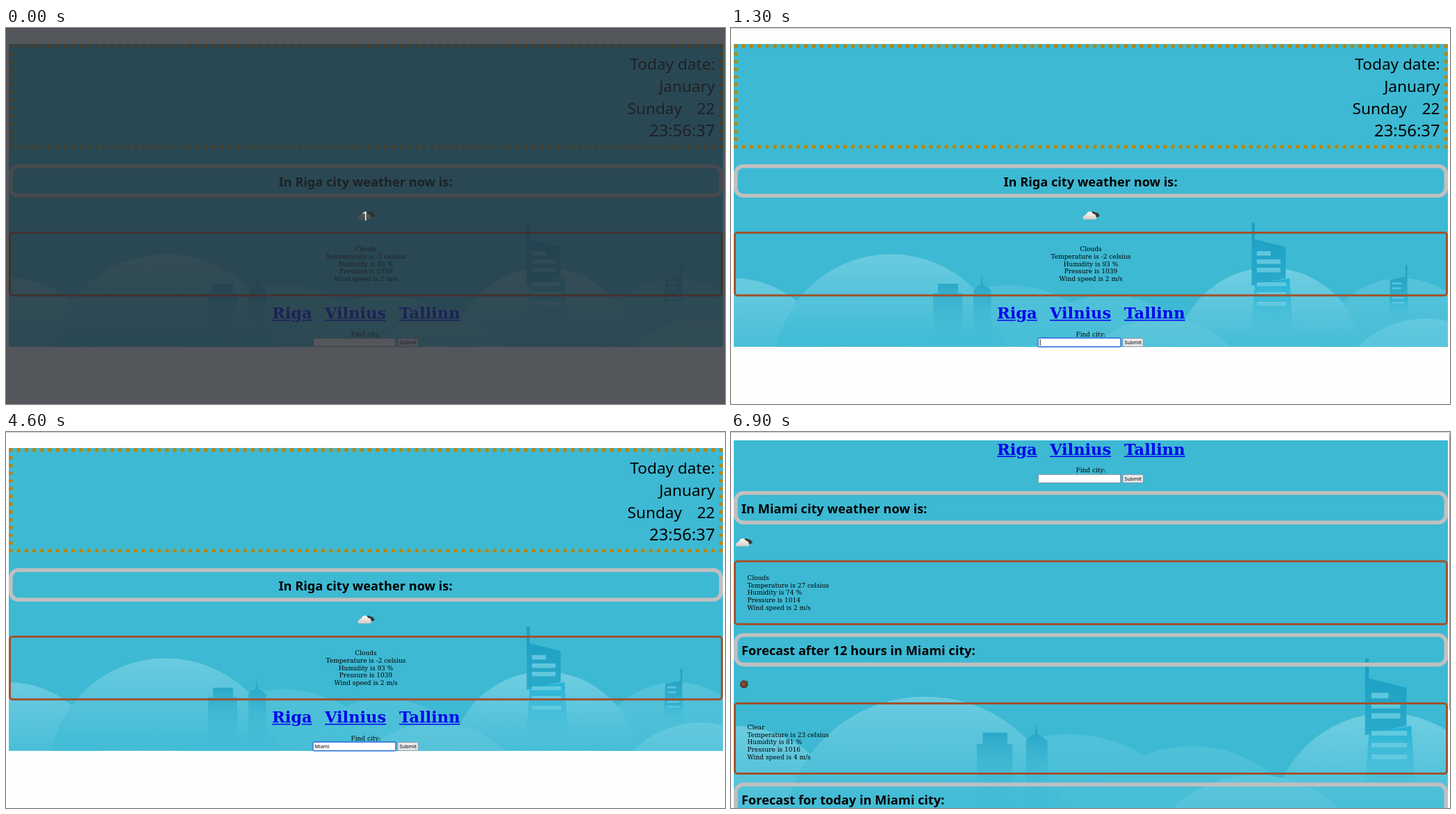
An HTML page with a canvas that plays this animation: 1035 by 541 pixels, repeating every 8 s.

```html
<!DOCTYPE html>
<html lang="en">
<head>
<meta charset="utf-8">
<title>City weather</title>
<style>
html, body { margin: 0; width: 100%; height: 100%; overflow: hidden; background: #fefefd; }
canvas { display: block; width: 1035px; height: 541px; }
</style>
</head>
<body>
<canvas id="stage" width="1035" height="541"></canvas>
<script>
const ctx = document.getElementById('stage').getContext('2d');
const LOOP = 8000, W = 1035, H = 541, LEFT = 4, RIGHT = 1032;
const TEAL = '#3db9d3';
const SERIF = '"DejaVu Serif", serif';
const SANS = '"Noto Sans", "Open Sans", sans-serif';
const COMIC = '"Comic Sans MS", "Comic Neue", "Noto Sans", sans-serif';
const CITIES = ['Mexico', 'Miami', 'Monaco', 'Magadan', 'Moscow'];

function rect(x, y, w, h, color) {
  ctx.fillStyle = color;
  ctx.fillRect(x, y, w, h);
}

function poly(color, ...pts) {
  ctx.fillStyle = color;
  ctx.beginPath();
  for (let i = 0; i < pts.length; i += 2) ctx.lineTo(pts[i], pts[i + 1]);
  ctx.fill();
}

function dot(x, y, r, color) {
  ctx.fillStyle = color;
  ctx.beginPath();
  ctx.arc(x, y, r, 0, 7);
  ctx.fill();
}

function panel(x, y, w, h, r, fill, line, width = 1) {
  ctx.beginPath();
  ctx.roundRect(x, y, w, h, r);
  if (fill) { ctx.fillStyle = fill; ctx.fill(); }
  if (line) { ctx.strokeStyle = line; ctx.lineWidth = width; ctx.stroke(); }
}

function text(str, x, y, font, align = 'left', color = '#000') {
  ctx.font = font;
  ctx.textAlign = align;
  ctx.fillStyle = color;
  ctx.fillText(str, x, y);
}

function fade(y0, y1, from, to) {
  const g = ctx.createLinearGradient(0, y0, 0, y1);
  g.addColorStop(0, from);
  g.addColorStop(1, to);
  return g;
}

const dome = (x, y, r, from = '#6acbdf') =>
  dot(x, y, r, fade(y - r, y - r + 120, from, '#43bcd6'));

function windows(x, w, ys, h, color) {
  for (const y of ys) rect(x, y, w, h, color);
}

// Skyline image, anchored to the top left corner of the page body
function skyline(top, bottom, scale) {
  ctx.save();
  ctx.beginPath();
  ctx.rect(LEFT, top, RIGHT - LEFT, bottom - top);
  ctx.clip();
  rect(0, top, W, H, TEAL);
  ctx.translate(LEFT, top);
  ctx.scale(scale, scale);
  ctx.translate(-4, -23);

  dome(965, 480, 120, '#55c3da');
  dome(400, 540, 170, '#50c1d9');
  dome(545, 534, 150, '#4fc1d9');
  dome(4, 500, 140);
  dome(230, 494, 168.6);
  dome(775, 481, 136, '#70cee1');

  const block = fade(368, 455, '#2aa8c9', 'rgba(67,188,214,0)');
  rect(298, 368, 29, 14, block);
  rect(291, 381.5, 42, 78, block);
  poly(block, 361, 355, 363, 370, 368, 372, 374.5, 378, 374.5, 458, 349, 458, 349, 378, 354, 372, 359.5, 370);

  const steel = fade(280, 375, '#1b9ec2', '#2aabcc');
  poly(steel, 749.5, 280, 754, 281, 754, 304, 798.5, 315, 798.5, 360, 749.5, 371);
  poly(fade(360, 434, '#22b2d6', 'rgba(60,186,214,.15)'), 754, 369, 804, 360, 809, 434, 749, 434);
  windows(757, 20, [321], 6.5, '#5ec7dd');
  windows(757, 34, [333, 345], 6.5, '#5ec7dd');
  windows(757, 42, [366, 380, 394], 5.5, '#63cae0');

  poly(fade(341, 400, '#219fc0', '#38b2d0'), 971, 341, 973.5, 341, 973.5, 394, 948, 394, 949, 362, 971, 358);
  poly(fade(380, 422, '#2bb2d3', 'rgba(67,188,214,0)'), 948, 384, 974, 380, 975, 422, 947, 422);
  windows(952, 13, [366, 373], 3, '#55c2da');
  windows(952, 17, [387, 394], 2.5, '#5ec7dd');

  dome(620, 560, 142, '#5cc6db');
  dome(1000, 556, 138, '#63c9de');
  ctx.restore();
}

function dottedFrame(top, bottom) {
  const gold = '#b8860b', x0 = 6.9, x1 = 1029.2, nx = 91, ny = 13;
  for (let i = 0; i <= nx; i++) {
    const x = x0 + (x1 - x0) * i / nx;
    dot(x, top, 2.8, gold);
    dot(x, bottom, 2.8, gold);
  }
  for (let i = 1; i < ny; i++) {
    const y = top + (bottom - top) * i / ny;
    dot(x0, y, 2.8, gold);
    dot(x1, y, 2.8, gold);
  }
}

function heading(str, top, centered) {
  panel(LEFT + 2.8, top + 2.8, 1022.4, 42.4, 11, null, '#c0c0c0', 5.6);
  text(str, centered ? 517.5 : 15, top + 31.7, 'bold 18.2px ' + COMIC, centered ? 'center' : 'left');
}

function report(lines, top, height, first, centered) {
  panel(LEFT + 1.5, top + 1.5, 1025, height - 3, 4, null, '#a0522d', 3);
  lines.forEach((s, i) =>
    text(s, centered ? 518 : 23.5, first + i * 10.69, '9px ' + SERIF, centered ? 'center' : 'left'));
}

const conditions = (sky, temp, hum, press, wind) => [
  sky, `Temperature is ${temp} celsius`, `Humidity is ${hum} %`,
  `Pressure is ${press}`, `Wind speed is ${wind} m/s`
];

function cloud(x, y) {
  const dark = '#3b3638';
  dot(x + 15, y + 5, 3.6, dark);
  dot(x + 19, y + 6, 3.4, dark);
  panel(x + 12, y + 5, 12, 4, 2, dark);
  const white = fade(y + 1, y + 13, '#ffffff', '#d5c6c0');
  dot(x + 10, y + 6.5, 5, white);
  dot(x + 5, y + 9, 3.2, white);
  dot(x + 15, y + 8.5, 3.8, white);
  panel(x, y + 8, 19.5, 4.7, 2.3, white);
}

function moon(x, y) {
  const g = ctx.createRadialGradient(x - 1, y - 1, 1, x, y, 6);
  g.addColorStop(0, '#80553f');
  g.addColorStop(1, '#4c2f24');
  dot(x, y, 5.8, g);
  dot(x + 5, y - 4, 1, '#6b5a52');
}

function link(word, x, y) {
  const font = 'bold 22.5px ' + SERIF, blue = '#0000ee';
  text(word, x, y, font, 'left', blue);
  const width = s => ctx.measureText(s).width;
  const g = word.indexOf('g');
  const line = (a, b) => rect(x + a, y + 1.8, b - a, 1.5, blue);
  if (g < 0) return line(0, width(word));
  line(0, width(word.slice(0, g)) - 0.5);
  line(width(word.slice(0, g + 1)) - 0.5, width(word));
}

// Links, label, text field and button; dy moves the whole block
function search(dy, s = {}) {
  ctx.save();
  ctx.translate(0, dy);
  link('Riga', 383, 418);
  link('Vilnius', 459, 418);
  link('Tallinn', 566, 418);
  text('Find city:', 518, 443.7, '9px ' + SERIF, 'center');

  if (s.focus) {
    panel(441, 445, 121, 14.6, 2.5, '#8fbbea');
    panel(442, 446, 119, 12.7, 1.5, '#fff', '#1468d6', 1.3);
  } else {
    panel(442.5, 446.5, 118, 11.8, 0.6, '#fff', s.hover ? '#55555c' : '#8f8f9d', 0.9);
  }
  if (s.value) text(s.value, 444.3, 455, '7.2px ' + SANS);
  if (s.caret) rect(s.caret, 448, 0.9, 9, '#000');

  const fills = ['#e9e9ed', '#d0d0d7', '#b1b1b9'];
  const lines = ['#8f8f9d', '#676774', '#484851'];
  const b = s.button || 0;
  panel(564, 446.5, 29.4, 11.8, 1.8, fills[b], lines[b], 0.9);
  text('Submit', 578.7, 455.1, '7.35px ' + SANS, 'center');
  ctx.restore();
}

function dropdown(alpha, active) {
  ctx.save();
  ctx.globalAlpha = alpha;
  panel(441.8, 459.2, 118.4, 62.8, 3, '#fff', '#c4c4c8', 1);
  CITIES.forEach((city, i) => {
    if (i === active) rect(443, 462.6 + i * 11.2, 116, 11.2, '#e0e0e6');
    text(city, 445.6, 471.2 + i * 11.2, '7.7px ' + SANS);
  });
  ctx.restore();
}

function status(str, width, fill) {
  panel(-3, 532.4, width + 3, 14, 2.5, fill, '#b8b8b8', 0.9);
  text(str, 1.5, 541.3, '8px ' + SANS, 'left', '#2a2a2a');
}

function homePage(t) {
  skyline(23, 458.5, 1);
  dottedFrame(25.9, 170.8);
  const date = '22.6px ' + COMIC;
  text('Today date:', 1020.5, 60, date, 'right');
  text('January', 1020.5, 92, date, 'right');
  text('Sunday', 973, 124, date, 'right');
  text('22', 1020.5, 124, date, 'right');
  text('23:56:37', 1020.5, 156, '23.8px ' + COMIC, 'right');

  heading('In Riga city weather now is:', 196, true);
  cloud(506.5, 262.8);
  report(conditions('Clouds', -2, 93, 1039, 2), 293, 93.3, 321.3, true);

  const within = (a, b) => t >= a && t < b;
  let caret = 0, button = 0;
  if (within(1000, 2100)) caret = 444.6;
  if (within(3300, 4500)) caret = 450;
  if (within(5700, 6000)) caret = 465.4;
  if (within(1200, 1300) || t >= 5800) button = 1;
  if (within(6000, 6100)) button = 2;
  search(0, {
    focus: within(1000, 6000),
    hover: within(500, 700) || within(800, 1000),
    value: t >= 4500 ? 'Miami' : t >= 2100 ? 'M' : '',
    caret, button
  });

  if (within(2100, 4600)) {
    const alpha = t < 2200 || t >= 4500 ? 0.5 : 1;
    dropdown(alpha, t < 4000 ? -1 : t < 4100 ? 0 : 1);
  }
  if (t >= 6100) status('localhost', 38.3, '#f4f4f4');
}

function cityPage(loaded) {
  // Once the icons arrive, each pushes the content below it down
  const icon = loaded ? 19.6 : 0;
  skyline(12, H, loaded ? 1.219 : 1.152);
  search(-385.3);
  heading('In Miami city weather now is:', 85);
  report(conditions('Clouds', 27, 74, 1014, 2), 165 + icon, 93.3, 193.3 + icon);
  heading('Forecast after 12 hours in Miami city:', 269.8 + icon);
  report(conditions('Clear', 23, 81, 1016, 4), 349.8 + icon * 2, 104, 388.8 + icon * 2);
  heading('Forecast for today in Miami city:', 465.2 + icon * 2);
  if (loaded) {
    cloud(6.7, 151.8);
    moon(18.7, 363);
  } else {
    status('Transferring data from localhost…', 133, '#fbfbfb');
  }
  rect(1033.8, 2, 1.2, loaded ? 398 : 422, '#9a9a9a');
}

function countdown() {
  rect(0, 0, W, H, 'rgba(37,42,49,.79)');
  text('1', 517.3, 276.5, '17.5px ' + SANS, 'center', '#fff');
}

function draw(t) {
  rect(0, 0, W, H, '#fefefd');
  rect(0, 0, W, 1, '#cbcbc9');
  if (t < 6800) homePage(t);
  else cityPage(t >= 6900);
  if (t < 100) countdown();
}

const start = performance.now();
function tick(now) {
  draw(Math.max(0, now - start) % LOOP);
  requestAnimationFrame(tick);
}
draw(0);
requestAnimationFrame(tick);
</script>
</body>
</html>
```
